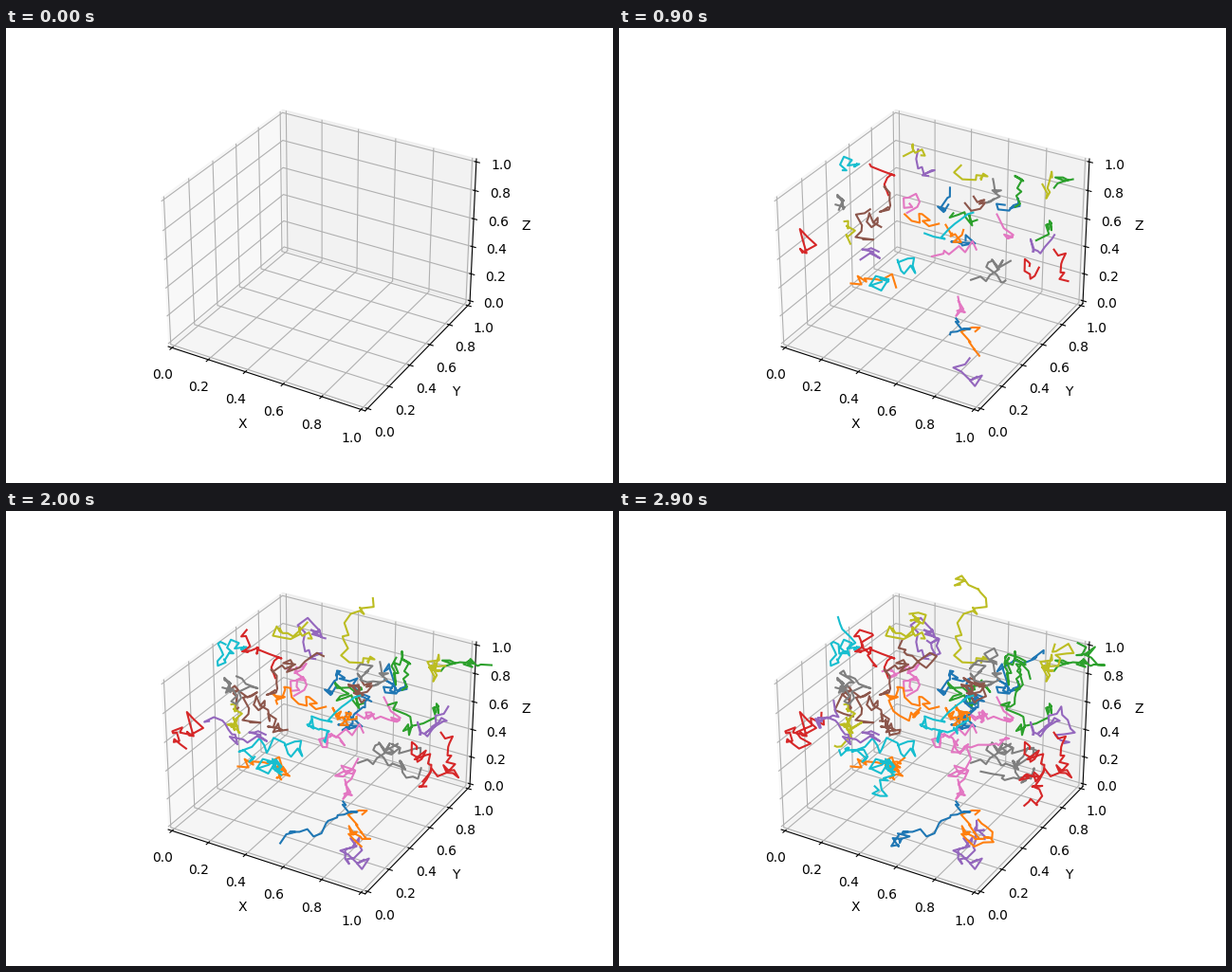
A matplotlib script that plays this animation: 640x480 px, repeating every 3000 ms.

```python
import numpy as np
import matplotlib.pyplot as plt
from matplotlib.animation import FuncAnimation

STEPS = 30
WALKS = 40
MAX_STEP = 0.05

rng = np.random.RandomState(19680801)


def random_walk():
    """Return one 3D random walk as a (STEPS, 3) array."""
    start = rng.random_sample(3)
    steps = rng.uniform(-MAX_STEP, MAX_STEP, size=(STEPS, 3))
    return start + np.cumsum(steps, axis=0)


walks = [random_walk() for _ in range(WALKS)]

# Leave a small gap between the outer ticks and the edges of the box
plt.rcParams["axes3d.automargin"] = True

fig = plt.figure(figsize=(6.4, 4.8), dpi=100)
ax = fig.add_subplot(projection="3d")
lines = [ax.plot([], [], [])[0] for _ in walks]

ax.set_xlim(0, 1)
ax.set_ylim(0, 1)
ax.set_zlim(0, 1)
ax.set(xlabel="X", ylabel="Y", zlabel="Z")


def update(num):
    for line, walk in zip(lines, walks):
        line.set_data_3d(walk[:num].T)
    return lines


ani = FuncAnimation(fig, update, frames=STEPS, interval=100, repeat=True)

plt.show()
```
